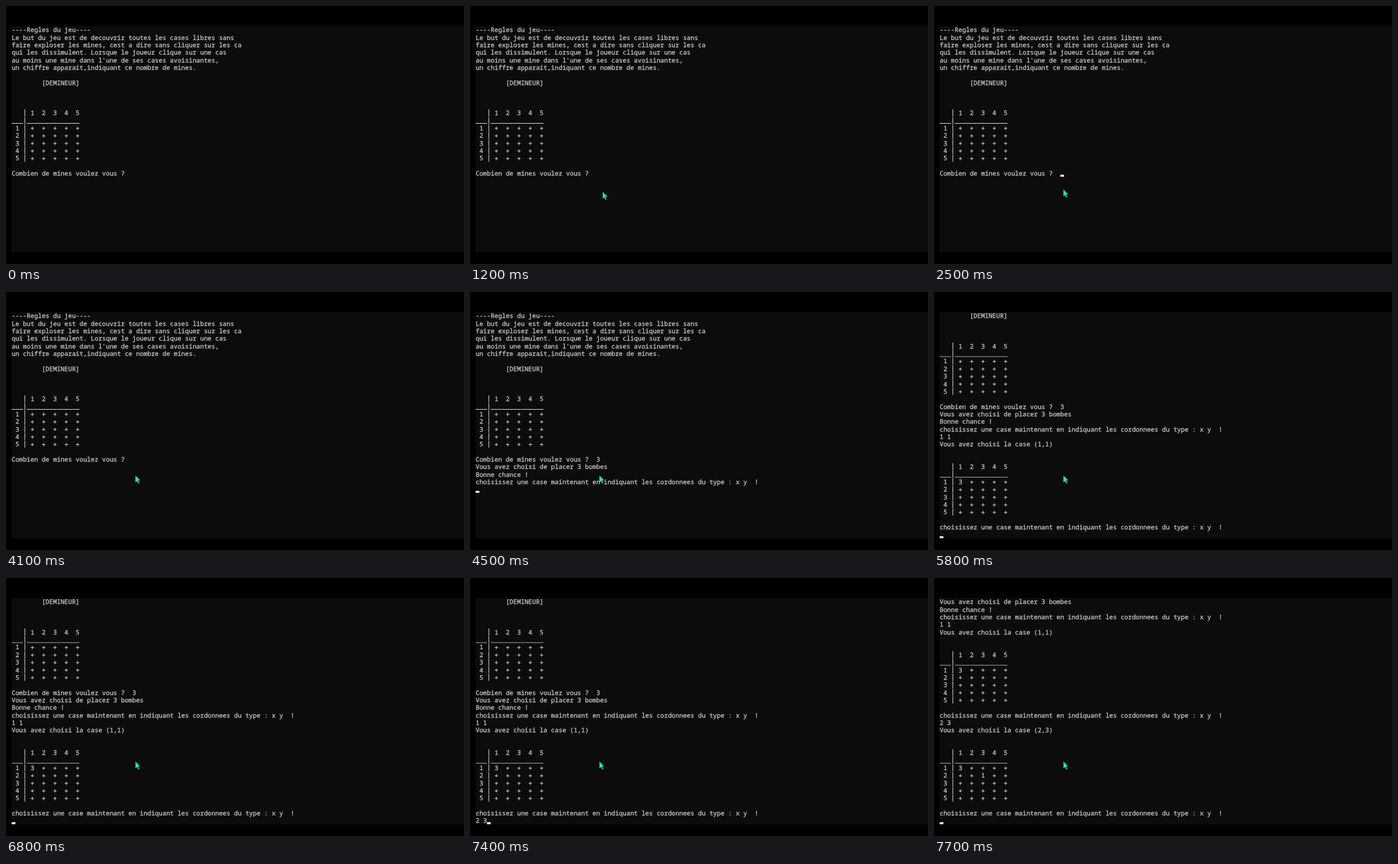
Write an HTML page with a canvas that moves like this. It is 690 px wide and 388 px high and loops after 8 s.

```html
<!DOCTYPE html>
<html lang="fr">
<head>
<meta charset="utf-8">
<title>Demineur</title>
<style>
html, body { margin: 0; width: 100%; height: 100%; overflow: hidden; background: #000; }
canvas { display: block; width: 690px; height: 388px; }
</style>
</head>
<body>
<canvas id="stage"></canvas>
<script>
const W = 690, H = 388, LOOP = 8000;
const LEFT = 8.5, TOP = 30.3, CW = 5.68, RH = 11.346, BASE = 9.1, ROWS = 30;
const INK = '#cccccc';

const canvas = document.getElementById('stage');
const dpr = window.devicePixelRatio || 1;
canvas.width = W * dpr;
canvas.height = H * dpr;
const ctx = canvas.getContext('2d');

const ASK = 'choisissez une case maintenant en indiquant les cordonnees du type : x y  !';
const RULES = [
  '----Regles du jeu----',
  'Le but du jeu est de decouvrir toutes les cases libres sans',
  'faire exploser les mines, cest a dire sans cliquer sur les ca',
  'qui les dissimulent. Lorsque le joueur clique sur une cas',
  "au moins une mine dans l'une de ses cases avoisinantes,",
  'un chiffre apparait,indiquant ce nombre de mines.',
  '', '        [DEMINEUR]', '', '', ''
];

// found maps "row,column" to the revealed digit
function board(found) {
  const n = [1, 2, 3, 4, 5];
  const line = r => ` ${r} | ` + n.map(c => found[r + ',' + c] || '+').join('  ');
  return ['   | ' + n.join('  '), '___|' + '_'.repeat(14), ...n.map(line), ''];
}

const intro = [...RULES, ...board({}), 'Combien de mines voulez vous ?  '];
const round1 = [
  ...intro.slice(0, -1), intro[intro.length - 1] + '3',
  'Vous avez choisi de placer 3 bombes', 'Bonne chance !', ASK
];
const round2 = [
  ...round1, '1 1', 'Vous avez choisi la case (1,1)', '', '',
  ...board({ '1,1': 3 }), ASK
];
const round3 = [
  ...round2, '2 3', 'Vous avez choisi la case (2,3)', '', '',
  ...board({ '1,1': 3, '2,3': 1 }), ASK
];

// [start, lines, typed text or null, caret shown]
const steps = [
  [0, intro, null, false],
  [1500, intro, null, true],
  [2000, intro, null, false],
  [2500, intro, null, true],
  [3000, intro, null, false],
  [3600, intro, null, true],
  [4100, intro, null, false],
  [4300, round1.slice(0, -3), null, true],
  [4500, round1, '', true],
  [5200, round1, '', false],
  [5400, round1, '1', true],
  [5600, round1, '1 ', true],
  [5700, round1, '1 1', false],
  [5800, round2, '', true],
  [5900, round2, '', false],
  [6800, round2, '', true],
  [6900, round2, '2', true],
  [7200, round2, '2 ', true],
  [7300, round2, '2 ', false],
  [7400, round2, '2 3', true],
  [7600, round2, '2 3', false],
  [7700, round3, '', true]
];

const pointerPath = [[1100, 207, 284.5], [1200, 200, 279.5], [1300, 195, 276]];
const ARROW = [[0, 0], [0, 10.4], [2.3, 8.3], [4.1, 12], [5.7, 11.2], [4, 7.6], [7, 7.3]];

const current = (list, t) => list.filter(s => s[0] <= t).pop();

function drawPlus(x, y) {
  ctx.fillRect(x - 2.4, y - 0.5, 4.8, 1);
  ctx.fillRect(x - 0.5, y - 2.4, 1, 4.8);
}

function drawLine(text, row) {
  const top = TOP + row * RH;
  [...text].forEach((ch, i) => {
    const x = LEFT + i * CW;
    if (ch === '_') {
      ctx.fillRect(x, top + RH - 1.7, CW, 0.9);
    } else if (ch === '|') {
      ctx.fillRect(x + CW / 2 - 0.5, top + 0.2, 1, RH - 0.6);
    } else if (ch === '+') {
      drawPlus(x + CW / 2, top + BASE - 2.9);
    } else if (ch !== ' ') {
      ctx.fillText(ch, x, top + BASE);
      ctx.strokeText(ch, x, top + BASE);
    }
  });
}

function drawPointer(x, y) {
  ctx.fillStyle = '#10e6ca';
  ctx.beginPath();
  ARROW.forEach(([dx, dy]) => ctx.lineTo(x + dx, y + dy));
  ctx.fill();
}

function draw(t) {
  // the tiny skew keeps text baselines from snapping to whole pixels
  ctx.setTransform(dpr, 1e-5, 0, dpr, 0, 0);
  ctx.fillStyle = '#000';
  ctx.fillRect(-1, -1, W + 2, H + 2);
  ctx.fillStyle = '#0c0c0c';
  ctx.fillRect(8.5, 30, W, 340.4);

  const [, lines, typed, caret] = current(steps, t);
  const all = typed === null ? lines : [...lines, typed];
  const view = all.slice(-ROWS);

  ctx.font = '9.467px "Noto Sans Mono", "DejaVu Sans Mono", monospace';
  ctx.textRendering = 'geometricPrecision';
  ctx.fillStyle = ctx.strokeStyle = INK;
  ctx.lineWidth = 0.25;
  view.forEach(drawLine);

  if (caret) {
    const row = view.length - 1;
    ctx.fillStyle = '#f2f2f2';
    ctx.fillRect(LEFT + view[row].length * CW, TOP + (row + 1) * RH - 3.5, CW, 3);
  }
  const p = current(pointerPath, t);
  if (p) drawPointer(p[1], p[2]);
}

const start = performance.now();
function tick() {
  draw((performance.now() - start) % LOOP);
  requestAnimationFrame(tick);
}
tick();
</script>
</body>
</html>
```
